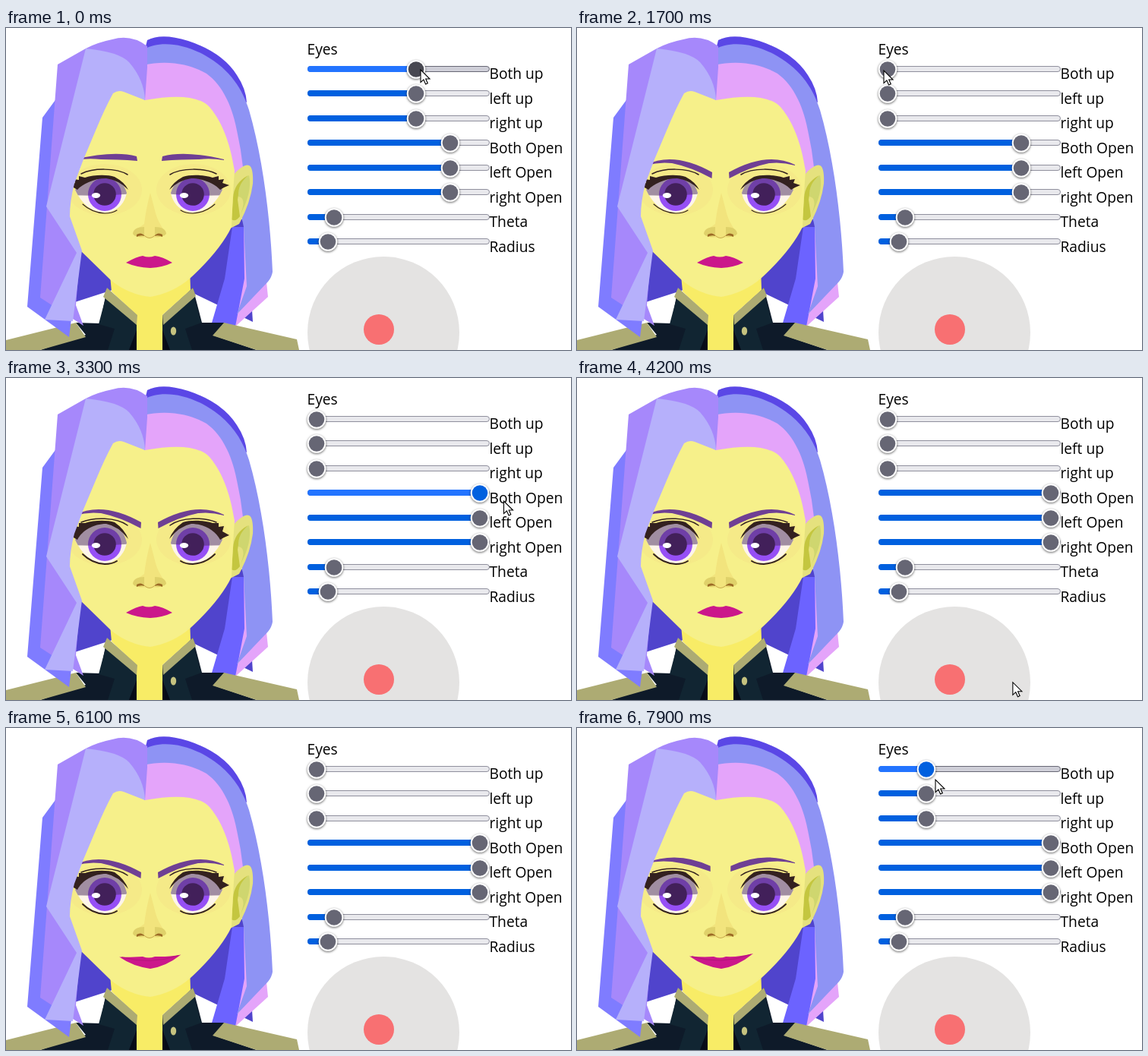
Animation, 744 px wide and 424 px high, one loop 8000 ms. Source, as an HTML page:

```html
<!DOCTYPE html>
<html lang="en">
<head>
<meta charset="utf-8">
<title>Face controls</title>
<style>
  html, body { margin: 0; width: 100%; height: 100%; overflow: hidden; background: #fff; }
  svg { display: block; width: 744px; height: 424px; }
  text { font: 19.2px "Open Sans", "Noto Sans", sans-serif; fill: #000; }
  .track { fill: #e9e9ed; stroke: #8f8f9d; }
  .fill { fill: #0060df; }
  .knob { fill: #666674; }
  .rim { fill: #fff; filter: drop-shadow(0 1.3px 1.4px #0009); }
  .hover .track, .active .track { fill: #cfcfd8; stroke: #676774; }
  .hover .fill, .active .fill { fill: #2374ff; }
  .hover .knob { fill: #484851; }
  .active .knob { fill: #0060df; }
  .lash { fill: #33211f; }
  .line { fill: none; stroke: #33211f; stroke-linecap: round; }
</style>
</head>
<body>
<svg viewBox="0 0 744 424">
  <defs>
    <clipPath id="lids"><path id="lidShape"/></clipPath>
    <g id="eye">
      <path id="white" fill="#fdf5ea"/>
      <g clip-path="url(#lids)">
        <circle cx="130" cy="219" r="22" fill="#964ff5"/>
        <path d="M84 178H166V218Q130 222 84 220Z" fill="#4d3161" opacity=".52"/>
        <circle cx="130" cy="219" r="14.8" fill="#42205a"/>
      </g>
      <path id="lash" class="lash"/>
      <path id="crease" class="line" stroke-width="1.5"/>
      <path id="under" class="line"/>
    </g>
    <path id="brow" fill="#6f3f94"/>
  </defs>

  <!-- hair behind the head -->
  <path fill="#5a47e6" d="M186 16Q205 6 240 17Q285 32 304 62Q316 80 317 98L250 70L180 40Z"/>
  <path fill="#5044cc" d="M82 240L75 366L140 345L160 300ZM300 235L240 310L242 347L325 387L317 262Z"/>
  <path fill="#6c63ff" d="M298 262H316L324 345L302 393L269 395L288 330Z"/>
  <path fill="#e4a4fa" d="M313 258L314 330L302 393L345 354L342 325Z"/>
  <path fill="#8e93f4" d="M182 28C200 17 232 19 262 36C296 55 312 82 320 108C338 170 348 250 351 321Q350 328 345 334L304 377L317 340L313 262L300 200L182 60Z"/>
  <path fill="#e4a4fa" d="M181 49C215 41 245 49 264 60C286 76 299 105 305 140Q314 180 314 225L298 262L182 110Z"/>

  <!-- uniform and neck -->
  <path fill="#0e1a29" d="M45 424L105 404L92 388L124 389L133 343L172 378H207L246 342L258 388H288L274 405L330 424Z"/>
  <path fill="#112532" d="M132 352L122 390L143 396L134 424H162L172 398V388ZM247 352L257 388L236 396L245 424H216L206 398V388Z"/>
  <path fill="#060b18" d="M172 398V424H162ZM206 398V424H216Z"/>
  <path fill="#f8ec66" d="M136 315L139 347L172 378V424H206V378L243 345L242 315Z"/>
  <path fill="#adab73" d="M133 342L173 378L172 391L128 354ZM246 342L206 378L207 391L250 353ZM0 411L92 388L105 407L45 424H0ZM287 388L383 410L386 424H330L272 405Z"/>
  <ellipse cx="220.5" cy="399" rx="3.7" ry="5.5" fill="#c5c27f"/>

  <!-- ear and face -->
  <path fill="#e5e17e" d="M296 197C304 188 314 178 320 181Q326 184 325 205Q322 230 307 258L295 264Z"/>
  <path fill="#c4c63f" d="M319 194Q300 204 299 224L297 252Q302 256 308 248L305 226Q308 204 319 194Z"/>
  <path fill="#cfd66f" d="M320 194Q325 215 308 247Q318 224 306 222Q305 204 320 194Z"/>
  <path fill="#f6f08a" d="M125 90L140 78H160L183 95Q248 83 268 104C288 128 296 158 301 188Q299 214 297 262Q282 293 243 329Q220 349 190 354Q161 351 138 332L98 293L80 245Z"/>
  <g fill="#f5ea88">
    <ellipse cx="130" cy="213" rx="49" ry="34"/>
    <ellipse cx="247" cy="213" rx="49" ry="34"/>
  </g>
  <path fill="#f2e47d" d="M190 217Q184 240 182 258L167 269L176 276H200L211 270Q201 258 197 244Z"/>
  <path fill="#dfd16a" d="M182 262Q168 262 167 271Q171 277 182 274ZM196 262Q210 262 211 271Q206 277 196 274Z"/>
  <path fill="#9c6a25" d="M172 272Q178 268 183 274Q177 272 172 275ZM206 272Q200 268 195 274Q201 272 206 275Z"/>
  <path fill="none" stroke="#c9aa4c" d="M183 274Q189 279 195 274"/>

  <g id="face">
    <use href="#eye"/>
    <use href="#eye" transform="matrix(-1 0 0 1 376 0)"/>
    <g fill="#fff">
      <ellipse cx="118.5" cy="220.5" rx="5.6" ry="3.4"/>
      <ellipse cx="234.5" cy="220.5" rx="5.6" ry="3.4"/>
    </g>
    <use href="#brow"/>
    <use href="#brow" transform="matrix(-1 0 0 1 378 0)"/>
    <path id="mouth" fill="#cb178b"/>
    <path id="lipLine" fill="none" stroke="#a91272"/>
  </g>

  <!-- hair in front -->
  <path fill="#7f7cff" d="M70 88L48 118L28 367L83 407L86 384L75 240Z"/>
  <path fill="#a688fb" d="M105 27L68 48L45 355L102 392L92 365L98 293L60 235L130 60L183 95L186 52V24Q165 8 140 15Q120 19 105 27Z"/>
  <path fill="#b6b0fb" d="M105 27L53 235L93 296L51 384L88 386L100 293L84 248Q84 228 90 205L102 173L118 135Q130 106 141 86Q148 81 155 84L183 95Q182 68 162 45Q148 31 105 27Z"/>

  <!-- panel -->
  <text x="396.5" y="35">Eyes</text>
  <circle cx="497" cy="401" r="100" fill="#e4e3e2"/>
  <circle cx="491" cy="397" r="20" fill="#f87072"/>
  <g id="rows"></g>
  <path id="cursor" d="M0 0V16.6L3.9 13L6.6 19L9.3 17.8L6.7 12H12Z" fill="#fff" stroke="#000" stroke-width="1.1"/>
</svg>
<script>
  const LOOP = 8000, STEP = 100;
  const $ = id => document.getElementById(id);
  const setPath = (id, d) => $(id).setAttribute('d', d);

  // Linear value at time t through [time, value] points
  function at(t, points) {
    let i = 0;
    while (i < points.length - 2 && t >= points[i + 1][0]) i++;
    const [t0, a] = points[i], [t1, b] = points[i + 1];
    return a + (b - a) * Math.min(1, Math.max(0, (t - t0) / (t1 - t0)));
  }

  const upX = [[0, 540], [800, 540], [1000, 516], [1500, 409], [7200, 409], [7900, 460]];
  const openX = [[0, 585], [2500, 585], [3100, 624]];
  const smileAt = [[5400, 0], [6200, 1]];
  const pointerX = [[0, 546], [700, 546], [1000, 494], [1500, 402], [1700, 404], [2200, 578],
    [2500, 579], [3200, 655], [3600, 657], [4300, 560], [6400, 520], [6800, 391], [6900, 391],
    [7100, 409], [7900, 472]];
  const pointerY = [[0, 55], [1000, 53], [1700, 56], [2200, 158], [3300, 162], [3600, 165],
    [4300, 440], [6400, 440], [6800, 46], [6900, 44], [7100, 57], [7900, 68]];

  // Row under the pointer: [row, enter, press, release, leave]
  const touches = [[0, 0, 600, 1600, 1700], [3, 2200, 2500, 3500, 3600], [0, 7000, 7200, 8000, 8000]];
  function rowState(row, t) {
    const hit = touches.find(([r, enter, , , leave]) => r === row && t >= enter && t < leave);
    return !hit ? '' : t >= hit[2] && t < hit[3] ? 'active' : 'hover';
  }

  const labels = ['Both up', 'left up', 'right up', 'Both Open', 'left Open', 'right Open', 'Theta', 'Radius'];
  $('rows').innerHTML = labels.map((label, i) => {
    const y = 54 + i * 32.5;
    return `
    <g>
      <g transform="translate(0 ${Math.floor(y)})">
        <rect class="track" x="397.5" y="-3.5" width="239" height="7" rx="3.5"/>
        <rect class="fill" x="397" y="-4" height="8" rx="4"/>
        <g class="thumb"><circle class="rim" r="12.3"/><circle class="knob" r="10.3"/></g>
      </g>
      <text x="636.5" y="${Math.ceil(y) + 13}">${label}</text>
    </g>`;
  }).join('');
  const rows = [...$('rows').children];

  function drawRow(row, i, x, t) {
    row.setAttribute('class', rowState(i, t));
    row.querySelector('.fill').setAttribute('width', x - 397);
    row.querySelector('.thumb').setAttribute('transform', `translate(${x} .5)`);
  }

  function drawEyes(o) {
    const lid = `M91 213C99 ${201 - 5 * o} 116 ${195 - 6 * o} 132 ${195 - 6 * o}
      C146 ${196 - 6 * o} 155 ${204 - 3 * o} 159 217C156 232 146 ${242 + o} 130 ${243 + o}
      C112 ${242 + o} 100 232 91 213Z`;
    setPath('lidShape', lid);
    setPath('white', lid);
    setPath('lash', `M82 207L91 ${204 - 2 * o}L89 ${199 - 4 * o}L96 ${200 - 4 * o}L96 ${195 - 4 * o}
      L104 ${197 - 6 * o}C116 ${193 - 6 * o} 134 ${193 - 6 * o} 143 ${196 - 6 * o}
      Q156 ${203 - 4 * o} 161 ${213 - o}Q148 ${200 - 5 * o} 132 ${198 - 6 * o}
      C115 ${198 - 6 * o} 100 ${206 - 5 * o} 94 213L89 210Z`);
    setPath('crease', `M99 ${192 - 2 * o}C115 ${184 - o} 145 ${184 - o} 160 ${193 + o}`);
    setPath('under', `M101 232Q113 ${243 + o} 130 ${244 + o}Q140 ${244 + o} 146 ${240 + o}`);
    $('under').setAttribute('stroke-width', 1.1 + o * .8);
  }

  function drawBrow(up) {
    const f = up / .606, mix = (low, high) => low + (high - low) * f;
    setPath('brow', `M91 ${mix(180, 173)}Q${mix(128, 142)} ${mix(162, 161)} ${mix(178, 172)} ${mix(190, 169)}
      L${mix(177.5, 173)} ${mix(198, 175)}Q${mix(150, 146)} ${mix(183, 173)} 125 ${mix(178, 173)}
      Q108 ${mix(176, 171)} 91 ${mix(181, 174)}Z`);
  }

  function drawMouth(s) {
    const lx = 158 - 10 * s, rx = 219 + 13 * s, ly = 309 - 8.5 * s, ry = 309 - 12 * s;
    setPath('mouth', `M${lx} ${ly}Q${172 - 5 * s} ${301 + s} 180 ${300 + s}Q188 ${303 + s} 196 ${300 + s}
      Q${206 + 6 * s} ${301 + s} ${rx} ${ry}Q${207 + 4 * s} ${315 - s} 190 ${316 + s}
      Q${171 - 4 * s} ${315 - s} ${lx} ${ly}Z`);
    setPath('lipLine', `M${lx + 3} ${ly}Q189 ${309 + 4 * s} ${rx - 3} ${ry + s}`);
    $('lipLine').setAttribute('opacity', s * .7);
  }

  function frame(now) {
    const t = Math.floor(now / STEP) * STEP % LOOP;
    const up = at(t, upX), open = at(t, openX);
    [up, up, up, open, open, open, 432, 424].forEach((x, i) => drawRow(rows[i], i, x, t));
    drawEyes((open - 585) / 39);
    drawBrow((up - 409) / 216);
    drawMouth(at(t, smileAt));
    $('cursor').setAttribute('transform', `translate(${at(t, pointerX)} ${at(t, pointerY)})`);
    requestAnimationFrame(() => frame(performance.now() - start));
  }
  const start = performance.now();
  frame(0);
</script>
</body>
</html>
```
